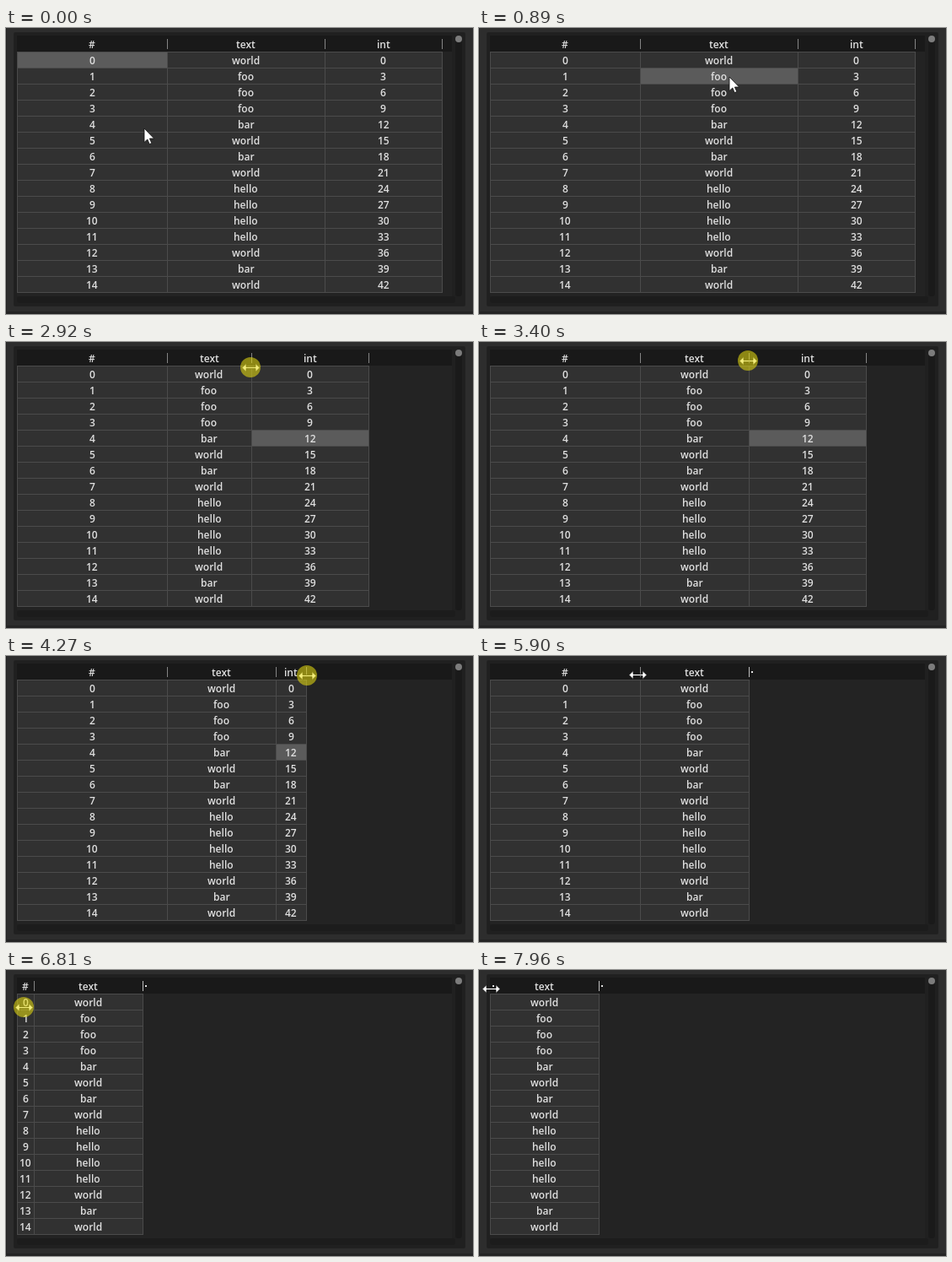
An HTML page that plays this animation: 554 px wide and 339 px high, repeating every 8 s.

```html
<!DOCTYPE html>
<html>
<head>
<meta charset="utf-8">
<style>
html, body { margin: 0; width: 100%; height: 100%; overflow: hidden; background: #2d2d2d; }
svg { display: block; width: 554px; height: 339px; }
text { font: 600 12px "Open Sans", "Noto Sans", sans-serif; fill: #e0e0e0; }
</style>
</head>
<body>
<svg id="stage" viewBox="0 0 554 339"></svg>
<script>
const LOOP = 8000, LEFT = 13, TOP = 28, ROW = 19, ROWS = 15;
const MIN_WIDTH = 20, CLICK_TIME = 110, GRIP_REACH = 10;
const stage = document.getElementById('stage');

const words = 'world foo foo foo bar world bar world hello hello hello hello world bar world'.split(' ');
const columns = [
  { title: '#', cells: words.map((_, i) => i), width: 178 },
  { title: 'text', cells: words, width: 187 },
  { title: 'int', cells: words.map((_, i) => i * 3), width: 139 },
];

// Each move curves through bend to its goal; it may click a cell there or drag a column's edge.
const home = [164, 119];
const moves = [
  { start: 30, end: 820, to: [296, 56], click: [1, 1] },
  { start: 890, end: 1600, to: [460, 106], bend: [385, 260], click: [2, 4] },
  { start: 1740, end: 2520, to: [377, 20], bend: [430, -37] },
  { start: 2620, end: 3400, to: [319, 22], bend: [229, 45], drag: 1 },
  { start: 3500, end: 3810, to: [460, 20] },
  { start: 4180, end: 4530, to: [311, 37], bend: [356, 14], drag: 2, press: 4040 },
  { start: 4800, end: 5500, to: [188, 22] },
  { start: 5920, end: 6640, to: [31, 41], drag: 0 },
  { start: 6710, end: 7260, to: [6, 57], bend: [21, 40], drag: 0 },
  { start: 7490, end: 7960, to: [14, 22] },
];
moves.forEach((move, i) => {
  move.from = i ? moves[i - 1].to : home;
  move.bend = move.bend || move.from.map((v, k) => (v + move.to[k]) / 2);
  const isDrag = 'drag' in move;
  move.press = move.press || (isDrag ? move.start : move.end - CLICK_TIME);
  move.release = isDrag ? moves[i + 1].start : move.end;
});

const easeOut = u => 1 - (1 - u) ** 3;

function pointOn({ start, end, from, bend, to }, t) {
  const s = easeOut(Math.min(1, Math.max(0, (t - start) / (end - start))));
  return from.map((v, k) => v * (1 - s) ** 2 + 2 * bend[k] * s * (1 - s) + to[k] * s * s);
}

function add(parent, tag, attrs, content) {
  const node = document.createElementNS('http://www.w3.org/2000/svg', tag);
  set(node, attrs);
  if (content !== undefined) node.textContent = content;
  return parent.appendChild(node);
}

function set(node, attrs) {
  for (const name in attrs) node.setAttribute(name, attrs[name]);
}

function show(node, visible) {
  node.style.display = visible ? '' : 'none';
}

const box = (parent, x, y, width, height, fill, rx = 0) =>
  add(parent, 'rect', { x, y, width, height, fill, rx });

box(stage, 0, 0, 554, 339, '#2d2d2d');
box(stage, 0, 0, 1, 339, '#222');
box(stage, 0, 336, 554, 3, '#242424');
box(stage, 9, 5, 536, 325, '#202020', 2);
box(stage, LEFT, TOP, 516, 290, '#232323');
box(stage, LEFT, 9, 516, ROW, '#191919');
box(stage, 533, 9, 8, 309, '#1a1a1a', 3);
box(stage, LEFT, 318, 520, 8, '#1c1c1c', 3);
add(stage, 'circle', { cx: 537, cy: 13, r: 4, fill: '#7c7c7c' });

const bodyHeight = ROW * ROWS + 1;
for (const col of columns) {
  col.body = add(stage, 'g', {});
  col.fill = box(col.body, 0, TOP, 0, bodyHeight, '#313131');
  col.mark = box(col.body, 0, 0, 0, ROW - 1, '#5b5b5b');
  col.lines = add(col.body, 'path', { stroke: '#4b4b4b', fill: 'none' });
  col.labels = [col.title, ...col.cells].map((label, i) => {
    const node = add(col.body, 'text', { y: 24 + ROW * i }, label);
    return { node, length: node.getComputedTextLength() };
  });
  col.grip = box(stage, 0, 13, 1, 12, 'rgba(255, 255, 255, 0.47)');
  col.dot = box(stage, 0, 18, 2, 2, '#e0e0e0');
}

const cursorStyle = { fill: '#fff', stroke: '#111', 'stroke-width': 0.8 };
const arrow = add(stage, 'path', { d: 'M0 0V16.5L3.8 13L6.2 18.6L8.8 17.5L6.4 12H11.6Z', ...cursorStyle });
const resizer = add(stage, 'path', { d: 'M-10.5 0L-5.5 -5V-1H5.5V-5L10.5 0L5.5 5V1H-5.5V5Z', ...cursorStyle });
const halo = add(stage, 'circle', { r: 12, fill: '#e8de10', opacity: 0.56 });

// A dragged column stops at its minimum, then collapses when pulled well past it.
function columnWidths(t) {
  const widths = columns.map(col => col.width);
  for (const move of moves) {
    if (move.start > t || !('drag' in move)) continue;
    const grab = moves.find(m => m.drag === move.drag).from[0];
    const wanted = columns[move.drag].width + pointOn(move, t)[0] - grab;
    widths[move.drag] = wanted < MIN_WIDTH / 2 ? 0 : Math.max(MIN_WIDTH, Math.round(wanted));
  }
  return widths;
}

function drawColumn(col, x, width, selectedRow) {
  const right = x + width;
  show(col.body, width > 0);
  show(col.grip, right > LEFT);
  show(col.dot, width === 0);
  show(col.mark, selectedRow >= 0);
  set(col.grip, { x: right });
  set(col.dot, { x: x + 3 });
  set(col.fill, { x, width: width + 1 });
  set(col.mark, { x: x + 1, width: Math.max(0, width - 1), y: TOP + 1 + ROW * selectedRow });
  let d = `M${x + .5} ${TOP}v${bodyHeight}M${right + .5} ${TOP}v${bodyHeight}`;
  for (let i = 0; i <= ROWS; i++) d += `M${x} ${TOP + .5 + ROW * i}h${width + 1}`;
  set(col.lines, { d });
  for (const { node, length } of col.labels) {
    set(node, { x: Math.floor(x + (width + 1 - length) / 2) });
  }
}

function draw(t) {
  const clicked = moves.filter(m => m.click && m.press <= t).pop();
  const [selectedCol, selectedRow] = clicked ? clicked.click : [0, 0];
  const edges = [];
  let x = LEFT;
  columnWidths(t).forEach((width, i) => {
    drawColumn(columns[i], x, width, i === selectedCol ? selectedRow : -1);
    edges.push(x += width);
  });

  const current = moves.filter(m => m.start <= t).pop() || moves[0];
  const [px, py] = pointOn(current, t).map(Math.round);
  const held = moves.find(m => m.press <= t && t < m.release);
  const overGrip = py < 40 && edges.some(edge => Math.abs(edge - px) < GRIP_REACH);
  const resizing = overGrip || Boolean(held && 'drag' in held);
  show(arrow, !resizing);
  show(resizer, resizing);
  show(halo, held);
  set(arrow, { transform: `translate(${px} ${py})` });
  set(resizer, { transform: `translate(${px + .5} ${py + .5})` });
  set(halo, { cx: px, cy: py });
}

const start = performance.now();
function tick() {
  draw((performance.now() - start) % LOOP);
  requestAnimationFrame(tick);
}
tick();
</script>
</body>
</html>
```
